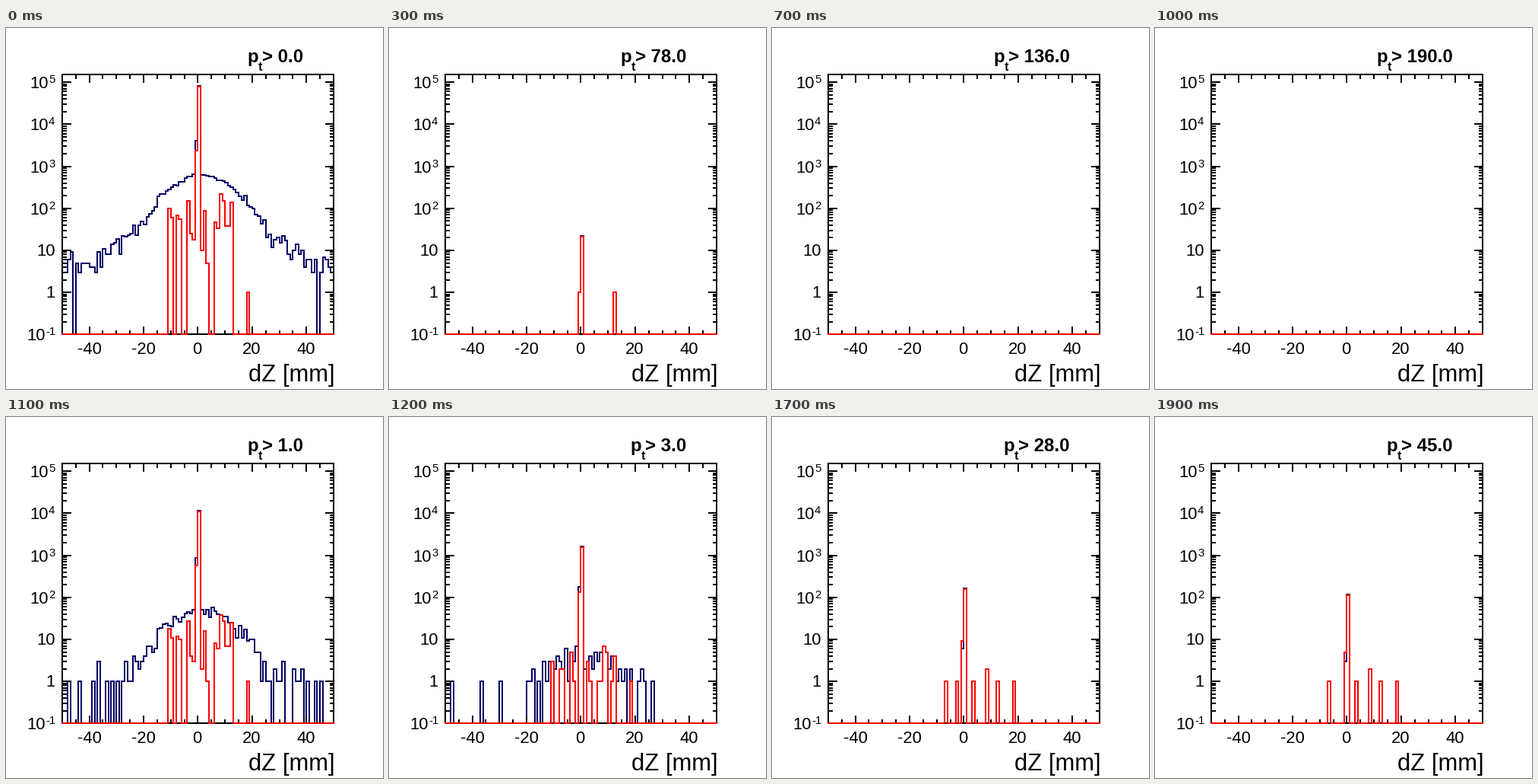
Animation, 496 px wide and 474 px high, one loop 2000 ms. Source, as a matplotlib script:

```python
import numpy as np
import matplotlib.pyplot as plt
from matplotlib.animation import FuncAnimation

W, H, DPI = 496, 474, 64
PX = 72 / DPI                      # one pixel in points
LEFT, RIGHT, TOP, BASE = 74, 431, 61, 402
X0, BIN = 73.91, 3.57
Y0, DECADE = 402.35, 55.2
NAVY, RED = "#000066", "#ff0000"
LOW, BINS = -50, 100

fig = plt.figure(figsize=(W / DPI, H / DPI), dpi=DPI, facecolor="white")
ax = fig.add_axes([0, 0, 1, 1])
ax.set_xlim(0, W)
ax.set_ylim(H, 0)
ax.axis("off")


def px(value):
    return np.floor(X0 + (np.asarray(value) - LOW) * BIN + 0.5)


def py(count):
    y = Y0 - DECADE * (np.log10(np.maximum(count, 0.1)) + 1)
    return np.floor(y + 0.5)


def line(xs, ys, color="black", z=2):
    return ax.plot(xs, ys, color=color, lw=2 * PX, antialiased=False, snap=False,
                   solid_capstyle="projecting", solid_joinstyle="miter", zorder=z)[0]


def label(x, y, text, size, weight="normal", ha="left"):
    return ax.text(x, y, text, fontsize=size * PX, family="Liberation Sans",
                   weight=weight, ha=ha, va="baseline", zorder=4)


# Background: a smooth hump with counting noise, thinned by every harder cut
HUMP = [(-50, 5), (-35, 8), (-30, 18), (-22, 36), (-17, 80), (-15, 190),
        (-10, 320), (-2, 650), (5, 560), (10, 420), (15, 210), (20, 100),
        (25, 26), (32, 14), (40, 7), (49, 4)]
EMPTY_BIN = -46
KEEP = 0.08
rng = np.random.default_rng(11)


def make_background(steps):
    x, n = np.array(HUMP).T
    counts = rng.poisson(10 ** np.interp(np.arange(LOW, LOW + BINS), x, np.log10(n)))
    counts[EMPTY_BIN - LOW] = 0
    levels = [counts]
    while len(levels) < steps:
        levels.append(rng.binomial(levels[-1], KEEP))
    return levels


background = make_background(20)

# Side peaks of the red histogram: bin -> (count without cut, last step seen)
PEAKS = {-11: (100, 2), -10: (61, 1), -8: (68, 2), -7: (55, 9), -4: (150, 4),
         -3: (25, 8), -2: (18, 1), 1: (10, 1), 2: (88, 3), 3: (5, 9), 6: (46, 5),
         7: (33, 2), 8: (215, 9), 9: (150, 2), 10: (38, 1), 11: (38, 2),
         12: (140, 13), 18: (1, 9)}

# Central bins: counts at a few key steps, geometric in between
KEYS = [0, 2, 4, 9, 12, 16]
CENTRE = [79000, 1580, 260, 114, 21, 0]
SIDE_RED = [2400, 130, 21, 5, 1, 0]
SIDE_BLUE = [4000, 180, 18, 3, 1, 0]


def track(step, values):
    return np.round(np.expm1(np.interp(step, KEYS, np.log1p(values))))


def red_counts(step):
    counts = np.zeros(BINS)
    fade = 10 ** -np.interp(step, [0, 2, 4], [0, 1.5, 2])
    for b, (n, last) in PEAKS.items():
        if step <= last:
            counts[b - LOW] = max(1, round(n * fade))
    counts[-1 - LOW] = track(step, SIDE_RED)
    counts[-LOW] = track(step, CENTRE)
    return counts


def blue_counts(step):
    counts = np.maximum(background[step], red_counts(step))
    counts[-1 - LOW] = track(step, SIDE_BLUE)
    counts[-LOW] = 1.03 * track(step, CENTRE)
    return counts


def outline(counts):
    edges = np.repeat(px(np.arange(LOW, LOW + BINS + 1)), 2)
    return edges, np.concatenate([[BASE], np.repeat(py(counts), 2), [BASE]])


def draw_axes():
    line([LEFT, RIGHT, RIGHT, LEFT, LEFT], [TOP, TOP, BASE, BASE, TOP])
    for v in range(-45, 50, 5):
        x, size = px(v), 9 if v % 20 == 0 else 4
        line([x, x], [BASE, BASE - size])
        line([x, x], [TOP, TOP + size + 1])
        if v % 20 == 0:
            label(x - 0.5, 428, str(v), 22, ha="center")
    for power in range(-1, 6):
        for m in range(1, 10 if power < 5 else 2):
            y, size = py(m * 10.0 ** power), 11 if m == 1 else 5
            line([LEFT, LEFT + size], [y, y])
            line([RIGHT, RIGHT - size + 1], [y, y])
        y = py(10.0 ** power)
        if power == 0:
            label(52, y + 7, "1", 22)
        elif power == 1:
            label(40, y + 7, "10", 22)
        else:
            x = 31 if power > 0 else 27
            label(x, y + 8, "10", 22)
            label(x + 25, y + 1, str(power), 15)
    label(319, 464, "dZ [mm]", 31)


draw_axes()
blue = line([], [], NAVY, z=1)
red = line([], [], RED, z=3)
title = [label(0, 45, "p", 24, "bold"), label(0, 56, "t", 16, "bold"),
         label(0, 45, "", 24, "bold")]

# Order of the cuts: first, then the two-digit steps, then the one-digit ones
ORDER = [0, *range(10, 20), *range(1, 10)]


def update(i):
    step = ORDER[i]
    cut = f"{step * (step + 1) / 2:.1f}"
    x = 317 - 13 * (len(cut) - 3)
    for part, shift in zip(title, (0, 15, 20)):
        part.set_x(x + shift)
    title[2].set_text("> " + cut)
    blue.set_data(*outline(blue_counts(step)))
    red.set_data(*outline(red_counts(step)))
    return [blue, red, *title]


anim = FuncAnimation(fig, update, frames=len(ORDER), interval=100,
                     repeat=True, repeat_delay=0, blit=False)
plt.show()
```
